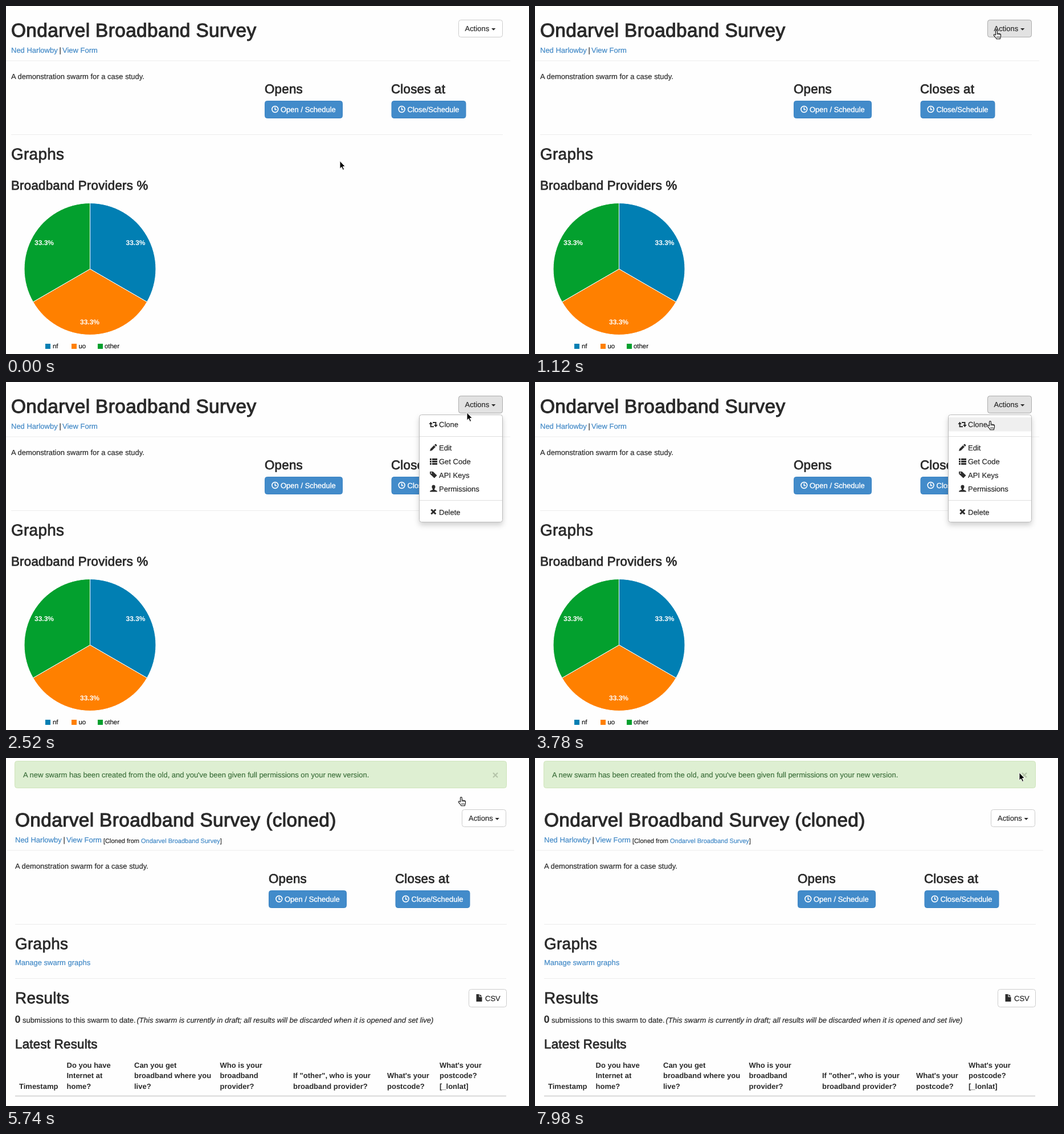
An HTML page for the animation above (8000 ms loop, 918 by 610 pixels).

```html
<!DOCTYPE html>
<html lang="en">
<head>
<meta charset="utf-8">
<title>Cloning a survey</title>
<style>
html, body { margin: 0; width: 100%; height: 100%; overflow: hidden; background: #fefefe; }
svg { display: block; }
text {
  font: 13px "Liberation Sans", Arial, sans-serif;
  fill: #2a2a2a;
  stroke: #2a2a2a;
  stroke-width: .2px;
  text-rendering: geometricPrecision;
  white-space: pre;
}
.h1, .h2, .h3 { letter-spacing: .011em; stroke-width: .8px; }
.h1 { font-size: 33.4px; stroke-width: 1.1px; }
.h2 { font-size: 27.9px; }
.h3 { font-size: 22.3px; }
.link { fill: #4088c6; stroke: #4088c6; }
.success { fill: #40733f; stroke: #40733f; }
.small { font-size: 11px; }
.light { fill: #fff; stroke: #fff; stroke-width: .35px; }
.bold { font-weight: bold; stroke: none; }
.count { font-size: 18px; }
.note { font-style: italic; }
.share { font-size: 12px; font-weight: bold; fill: #fff; stroke: none; text-anchor: middle; }
.key { font-size: 11.4px; fill: #111; }
.rule { stroke: #ececec; }
.primary { fill: #428bca; stroke: #3a83c2; }
.plain { fill: #fff; stroke: #ccc; }
.pie path { stroke: #fff; }
.panel { fill: #fff; stroke: #bcbcbc; filter: drop-shadow(0 5px 5px rgba(0, 0, 0, .18)); }
.icon { fill: #2c2c2c; }
.line { fill: none; stroke: #2c2c2c; stroke-width: 2; }
.thick { stroke-width: 3; }
.clock { fill: none; stroke: #fff; stroke-width: 1.6; }

/* one tick of 140 ms is 1.75% of the loop */
.anim { animation: 8s step-end -2ms infinite; }
#first { animation-name: first; }
#second { animation-name: second; }
#icons { animation-name: icons; }
#hot { animation-name: hot; }
#menu { animation-name: menu; }
#row { animation-name: row; }
#hand { animation-name: hand; }
#arrow { animation-name: arrow; }
#cursor { animation-name: move; }
@keyframes first { 0% { opacity: 1 } 59.5%, 100% { opacity: 0 } }
@keyframes second { 0% { opacity: 0 } 59.5%, 100% { opacity: 1 } }
@keyframes icons { 0% { opacity: 0 } 61.25%, 100% { opacity: 1 } }
@keyframes hot { 0% { opacity: 0 } 14%, 100% { opacity: 1 } }
@keyframes menu { 0% { opacity: 0 } 17.5%, 100% { opacity: 1 } }
@keyframes row { 0% { opacity: 0 } 36.75%, 100% { opacity: 1 } }
@keyframes hand {
  0%, 31.5%, 91%, 100% { opacity: 0 }
  14%, 36.75% { opacity: 1 }
}
@keyframes arrow {
  0%, 31.5%, 91%, 100% { opacity: 1 }
  14%, 36.75% { opacity: 0 }
}
@keyframes move {
  0% { transform: translate(586px, 272px) }
  5.25% { transform: translate(586px, 272px); animation-timing-function: steps(2) }
  8.75% { transform: translate(640px, 222px); animation-timing-function: steps(2) }
  12.25% { transform: translate(784px, 76px) }
  14% { transform: translate(810px, 43px); animation-timing-function: steps(2) }
  17.5% { transform: translate(811px, 47px) }
  26.25% { transform: translate(811px, 47px); animation-timing-function: steps(3) }
  31.5% { transform: translate(809px, 54px); animation-timing-function: steps(4) }
  38.5% { transform: translate(799px, 69px) }
  89.25% { transform: translate(799px, 69px); animation-timing-function: steps(3) }
  94.5% { transform: translate(822px, 51px); animation-timing-function: steps(3) }
  99.75%, 100% { transform: translate(850px, 26px) }
}
</style>
</head>
<body>
<svg width="918" height="610" viewBox="0 0 918 610">
  <defs>
    <g id="top">
      <text class="link" x="9" y="82">Ned Harlowby</text>
      <text x="93.5" y="82">|</text>
      <text class="link" x="99" y="82">View Form</text>
      <path class="rule" d="M-5 96H885"/>
      <text x="9" y="128">A demonstration swarm for a case study.</text>
      <text class="h3" x="454" y="153">Opens</text>
      <rect class="primary" x="454.5" y="166.5" width="136" height="30" rx="4"/>
      <text class="light" x="482" y="186">Open / Schedule</text>
      <text class="h3" x="676" y="153">Closes at</text>
      <rect class="primary" x="677" y="166.5" width="130" height="30" rx="4"/>
      <text class="light" x="704.5" y="186">Close/Schedule</text>
      <path class="rule" d="M9 225.5H872"/>
      <text class="h2" x="9" y="269">Graphs</text>
    </g>
    <path id="clock" class="clock" d="M-5.4 0a5.4 5.4 0 1 0 10.8 0a5.4 5.4 0 1 0-10.8 0M0-3.4V.6H2.8"/>
    <g id="clocks">
      <use href="#clock" x="472.3" y="181"/>
      <use href="#clock" x="694.6" y="181"/>
    </g>
    <rect id="box" x="794.5" y="24.5" width="77" height="30" rx="4"/>
    <g id="label">
      <text x="805.5" y="44">Actions</text>
      <path class="icon" d="M852 39h7.4l-3.7 3.8z"/>
    </g>
  </defs>

  <g id="first" class="anim">
    <text class="h1" x="9" y="54">Ondarvel Broadband Survey</text>
    <use href="#top"/>
    <use href="#clocks"/>
    <use href="#box" class="plain"/>
    <use id="hot" class="anim" href="#box" fill="#e2e2e2" stroke="#adadad"/>
    <use href="#label"/>

    <text class="h3" x="9" y="322">Broadband Providers %</text>
    <g class="pie" transform="translate(147.5 461)">
      <path fill="#017fb3" d="M0 0V-115.5A115.5 115.5 0 0 1 100 57.75z"/>
      <path fill="#ff8000" d="M0 0L100 57.75A115.5 115.5 0 0 1-100 57.75z"/>
      <path fill="#03a02e" d="M0 0L-100 57.75A115.5 115.5 0 0 1 0-115.5z"/>
    </g>
    <text class="share" x="227.5" y="419">33.3%</text>
    <text class="share" x="147" y="558">33.3%</text>
    <text class="share" x="67" y="419">33.3%</text>
    <path fill="#017fb3" d="M69 592h9v9h-9z"/>
    <path fill="#ff8000" d="M115 592h9v9h-9z"/>
    <path fill="#03a02e" d="M161 592h9v9h-9z"/>
    <text class="key" x="82" y="600">nf</text>
    <text class="key" x="127.5" y="600">uo</text>
    <text class="key" x="173" y="600">other</text>

    <g id="menu" class="anim">
      <rect class="panel" x="725.5" y="57.5" width="146" height="188" rx="4"/>
      <path id="row" class="anim" fill="#efefef" d="M726 62h145v24.5H726z"/>
      <path stroke="#dedede" d="M726 95.5H871M726 207.5H871"/>
      <text x="760" y="79">Clone</text>
      <text x="760" y="120">Edit</text>
      <text x="760" y="144">Get Code</text>
      <text x="760" y="168">API Keys</text>
      <text x="760" y="192">Permissions</text>
      <text x="760" y="233">Delete</text>
      <path class="line" d="M745.6 73v5.3h5.4M749 71h5.4v4.5"/>
      <path class="icon" d="M742.3 74l3.3-4.2 3.3 4.2zM751 75l3.4 4.2 3.4-4.2z"/>
      <path class="icon" d="M744 121l1-3.8 6.2-6.2 2.8 2.8-6.2 6.2zM752 110.2l1.3-1.3q.7-.6 1.4 0l1.4 1.4q.6.7 0 1.4l-1.3 1.3z"/>
      <path class="line thick" d="M744 135.5h2.8m1.2 0h9M744 139.5h2.8m1.2 0h9M744 143.5h2.8m1.2 0h9"/>
      <path class="icon" fill-rule="evenodd" d="M744 157h5.5l7 6.8-4.7 4.7-7.8-7.5zM745.5 159.5a1.1 1.1 0 1 0 2.2 0a1.1 1.1 0 1 0-2.2 0"/>
      <path class="icon" d="M750.5 180.5c4 0 3.6 5 1.5 7v1.3c2 .9 5 1.4 5 3.7h-13c0-2.3 3-2.8 5-3.7v-1.3c-2.1-2-2.5-7 1.5-7z"/>
      <path class="line thick" d="M746.3 223.5l8 8m0-8l-8 8"/>
    </g>
  </g>

  <g id="second" class="anim">
    <rect x="15.5" y="5.5" width="863" height="47" rx="4" fill="#deefd2" stroke="#cfe4bb"/>
    <text class="success" x="30" y="34">A new swarm has been created from the old, and you've been given full permissions on your new version.</text>
    <path d="M855 26l8 8m0-8l-8 8" stroke="#b5c4aa" stroke-width="2.2"/>
    <text class="h1" x="16" y="120">Ondarvel Broadband Survey (cloned)</text>
    <use href="#top" x="7" y="66"/>
    <text class="small" x="171" y="148.5">[Cloned from <tspan class="link">Ondarvel Broadband Survey</tspan>]</text>
    <use href="#box" class="plain" x="6" y="66"/>
    <use href="#label" x="6.5" y="66"/>
    <text class="link" x="16" y="363">Manage swarm graphs</text>
    <path class="rule" d="M16 386.5H878"/>

    <text class="h2" x="16" y="430">Results</text>
    <rect class="plain" x="812.5" y="405.5" width="66" height="31" rx="4"/>
    <text x="841" y="425.5">CSV</text>
    <text class="bold count" x="15.5" y="464">0</text>
    <text x="29" y="464">submissions to this swarm to date.</text>
    <text class="note" x="229.5" y="464">(This swarm is currently in draft; all results will be discarded when it is opened and set live)</text>

    <text class="h3" x="16" y="509">Latest Results</text>
    <text class="bold" x="23" y="580">Timestamp</text>
    <text class="bold"><tspan x="106.5" y="543">Do you have</tspan><tspan x="106.5" y="561">Internet at</tspan><tspan x="106.5" y="580">home?</tspan></text>
    <text class="bold"><tspan x="225" y="543">Can you get</tspan><tspan x="225" y="561">broadband where you</tspan><tspan x="225" y="580">live?</tspan></text>
    <text class="bold"><tspan x="375.5" y="543">Who is your</tspan><tspan x="375.5" y="561">broadband</tspan><tspan x="375.5" y="580">provider?</tspan></text>
    <text class="bold"><tspan x="504" y="561">If "other", who is your</tspan><tspan x="504" y="580">broadband provider?</tspan></text>
    <text class="bold"><tspan x="669" y="561">What's your</tspan><tspan x="669" y="580">postcode?</tspan></text>
    <text class="bold"><tspan x="761" y="543">What's your</tspan><tspan x="761" y="561">postcode?</tspan><tspan x="761" y="580">[_lonlat]</tspan></text>
    <path d="M16 592.5H878" stroke="#d8d8d8" stroke-width="2"/>

    <g id="icons" class="anim">
      <use href="#clocks" x="7" y="66"/>
      <path class="icon" d="M825.5 414h5v5h5v8h-10zM831.5 414l4 4h-4z"/>
    </g>
  </g>

  <g id="cursor" class="anim">
    <path id="arrow" class="anim" stroke="#fff" d="M0-.5V13.3L3.1 10.4 5.3 15.4 7.6 14.4 5.4 9.5H9.5z"/>
    <g id="hand" class="anim" stroke="#111" stroke-width="1.1" stroke-linejoin="round">
      <path fill="#fff" d="M-1.5 8V1a1.4 1.4 0 0 1 2.8 0V5.6c.3-1 2.2-.9 2.3.3c.3-.8 2-.7 2.1.5c.3-.6 1.8-.4 1.8.9V10c0 2-1.2 2.6-1.2 4.8H0c-.4-2-2.6-3.4-4.6-6.2c-.8-1.4.8-2.4 1.9-1.4z"/>
      <path fill="none" stroke-width=".8" d="M1.3 5.6V8M3.6 5.9V8M5.7 6.4V8M1 10v3M3 10v3M5 10v3"/>
    </g>
  </g>
</svg>
</body>
</html>
```
